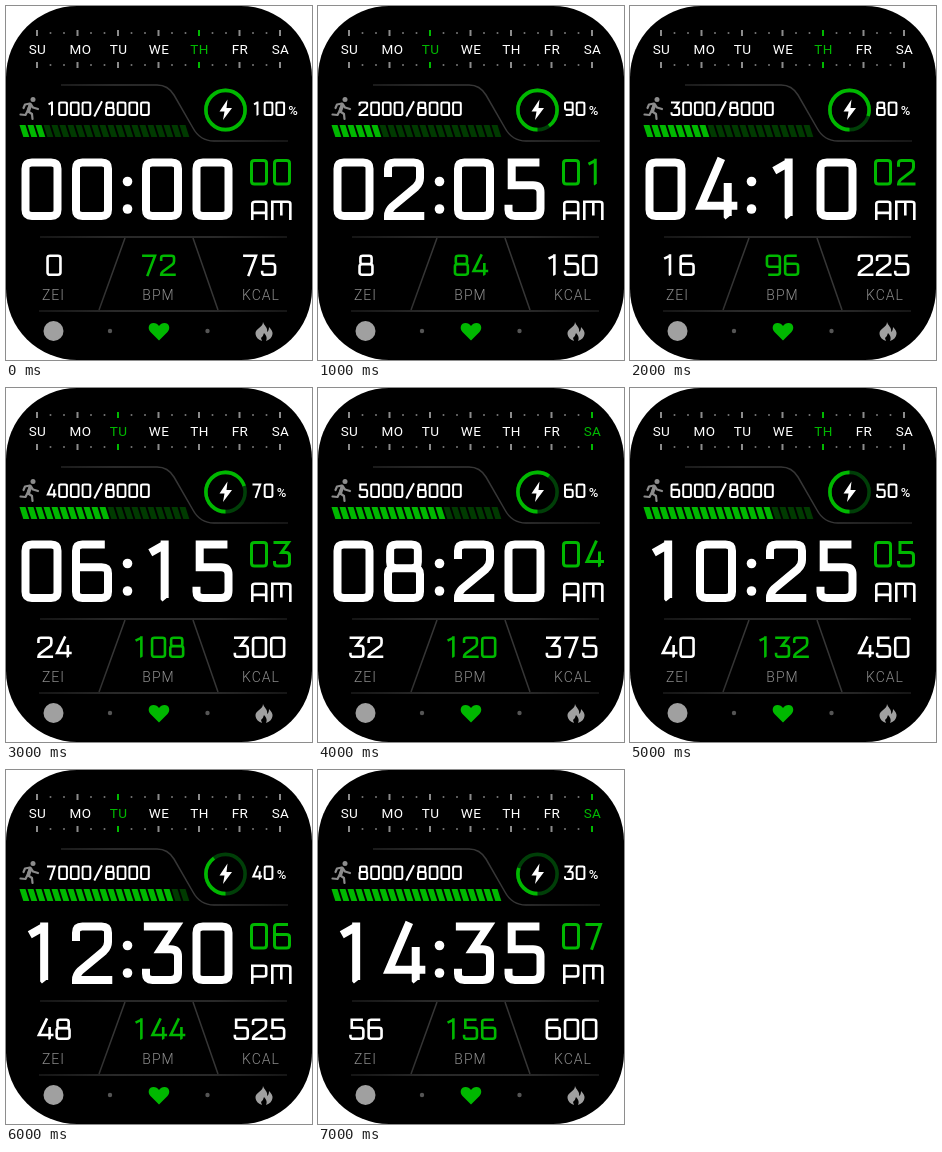
These frames come from a looping animation (306 px wide and 354 px high, 8 s). An HTML page:

```html
<!DOCTYPE html>
<html lang="en">
<head>
<meta charset="utf-8">
<title>Watch face</title>
<style>
  html, body { margin: 0; width: 100%; height: 100%; overflow: hidden; background: #fff; }
  svg { display: block; width: 306px; height: 354px; }
  text { font-family: Roboto, "Open Sans", sans-serif; text-anchor: middle; }
  .glyph path { fill: none; stroke: currentColor; vector-effect: non-scaling-stroke; stroke-miterlimit: 3; }
  .white { color: #fff; }
  .green { color: #00b800; }
  .line { fill: none; stroke: url(#fade); stroke-width: 1.5; }
  .label { font-size: 14px; font-weight: 300; letter-spacing: 1px; fill: #8c8c8c; }
  .day text { font-size: 13.5px; font-weight: 400; letter-spacing: .4px; fill: #fff; }
  .day path { stroke: #8c8c8c; stroke-width: 2; }
  .day.on text { fill: #00b800; }
  .day.on path { stroke: #00b800; }
  .bar { fill: #003a00; }
  .bar.on { fill: #00b800; }
</style>
</head>
<body>
<svg viewBox="0 0 306 354">
  <defs>
    <linearGradient id="fade" gradientUnits="userSpaceOnUse" x1="33" x2="283" y1="0" y2="0">
      <stop offset="0" stop-color="#1c1c1c"/>
      <stop offset=".3" stop-color="#363636"/>
      <stop offset=".7" stop-color="#363636"/>
      <stop offset="1" stop-color="#1c1c1c"/>
    </linearGradient>
  </defs>
  <rect width="306" height="354" rx="71"/>
  <g id="days"></g>

  <g class="line">
    <path d="M55 79H151Q162 79 168 89L187 122Q194 135 208 135H282"/>
    <path d="M34 231.01L281 231M33 305.01L281 305"/>
    <path d="M119 232L93 304M187 232L212 304"/>
  </g>

  <g fill="none" stroke="#8c8c8c" stroke-width="2.2" stroke-linecap="round" stroke-linejoin="round">
    <circle cx="27" cy="93.5" r="2.5" fill="#8c8c8c" stroke="none"/>
    <path d="M17.5 102L19 98.5L24 97.5L27 101.5L32 103"/>
    <path d="M24 98L21.5 105L26 108L26.5 113M21.5 105L19.5 109L14.5 108.5"/>
    <path d="M24.5 99L22.5 104.5" stroke-width="3.6"/>
  </g>
  <g id="bars"></g>

  <g fill="none" stroke-width="3.6">
    <circle cx="219.5" cy="104" r="19.6" stroke="#003f08"/>
    <circle id="ring" cx="219.5" cy="104" r="19.6" stroke="#00b800" pathLength="100" transform="rotate(90 219.5 104)"/>
  </g>
  <path d="M221.5 93.500L213.500 105.500H218.500L217 114L226 102H220.500Z" fill="#fff"/>

  <g id="steps" class="glyph white"></g>
  <g id="battery" class="glyph white"></g>
  <text id="percent" y="109" font-size="13" font-weight="500" fill="#fff">%</text>

  <g id="hours" class="glyph white"></g>
  <g id="minutes" class="glyph white"></g>
  <circle cx="121.500" cy="175.500" r="4.800" fill="#fff"/>
  <circle cx="121.500" cy="203" r="4.800" fill="#fff"/>
  <g id="seconds" class="glyph green"></g>
  <g id="half" class="glyph white"></g>

  <g id="score" class="glyph white"></g>
  <g id="pulse" class="glyph green"></g>
  <g id="energy" class="glyph white"></g>
  <text class="label" x="47.5" y="294">ZEI</text>
  <text class="label" x="152.5" y="294">BPM</text>
  <text class="label" x="255" y="294">KCAL</text>

  <circle cx="47.5" cy="325" r="10" fill="#a0a0a0"/>
  <circle cx="104" cy="325" r="2.2" fill="#555"/>
  <circle cx="201.5" cy="325" r="2.2" fill="#555"/>
  <path d="M153 334.5L144.5 326C141 322 143 317 147.5 317Q151 317 153 320Q155 317 158.5 317C163 317 165 322 161.5 326Z" fill="#00b800"/>
  <path d="M257 316C258 320 262 321 261 326Q263 325 263 321Q267 325 266.5 328Q266 333 260 335Q262 331 258 327Q257 331 255 332L256 335Q250 333 249.5 328C249 322 257 322 257 316Z" fill="#a0a0a0"/>
</svg>
<script>
  // Centre lines of the display face on a 30 x 52 cell.
  const bowl = 'M0 46Q0 52 6 52H24Q30 52 30 46V';
  const glyphs = {
    0: 'M6 0H24Q30 0 30 6V46Q30 52 24 52H6Q0 52 0 46V6Q0 0 6 0Z',
    1: 'M4 8L16 1M17.5 -4V52l.8 1',
    2: 'M0 14V6Q0 0 6 0H24Q30 0 30 6V15Q30 20 26 24L4 43Q0 47 0 52H34',
    3: 'M-2 0H28L14 22H23Q30 22 30 29V45Q30 52 23 52H6Q0 52 0 46V41',
    4: 'M20 -4L1 42H35M26 20V52l.8 1',
    5: 'M29 0H3V22H23Q30 22 30 29V45Q30 52 23 52H6Q0 52 0 46V41',
    6: 'M27 0H6Q0 0 0 6V46' + bowl + '28Q30 22 24 22H0',
    7: 'M-2 0H28L10 56',
    8: 'M8 0H22Q28 0 28 6V17Q28 23 22 23H8Q2 23 2 17V6Q2 0 8 0ZM0 46' + bowl + '29Q30 23 24 23H6Q0 23 0 29Z',
    9: 'M3 52H24Q30 52 30 46V6Q30 0 24 0H6Q0 0 0 6V24Q0 30 6 30H30',
    '/': 'M0 58L30 -5',
    A: 'M0 56V6Q0 0 6 0H24Q30 0 30 6V56M0 34H30',
    P: 'M0 56V0H24Q30 0 30 6V27Q30 33 24 33H0',
    M: 'M0 56V0H25Q30 0 30 6V56M15 0V42'
  };
  const $ = id => document.getElementById(id);

  function write(id, text, x, y, w, h, gap, weight) {
    $(id).innerHTML = [...String(text)].map((c, i) => {
      const cw = c === 'M' ? w * 1.25 : w;
      const left = x + i * (w + gap) + weight / 2;
      const sx = (cw - weight) / 30, sy = (h - weight) / 52;
      return `<path d="${glyphs[c]}" stroke-width="${weight}" transform="translate(${left} ${y + weight / 2}) scale(${sx} ${sy})"/>`;
    }).join('');
  }

  function stat(id, value, centre) {
    const n = String(value).length;
    write(id, value, centre - (n * 18.2 - 2.7) / 2, 248.5, 15.5, 21.5, 2.7, 2.6);
  }

  const names = ['SU', 'MO', 'TU', 'WE', 'TH', 'FR', 'SA'];
  const order = [4, 2, 4, 2, 6, 4, 2, 6];
  $('days').innerHTML = names.map((name, i) => {
    const x = 31 + i * 40.5;
    const dots = i < 6 ? [13.5, 27].map(d => [27, 59].map(y =>
      `<circle cx="${x + d}" cy="${y}" r="1" fill="#777"/>`).join('')).join('') : '';
    return `<g class="day"><path d="M${x} 24V30M${x} 56V62"/><text x="${x + (i === 1 ? 3 : 0.5)}" y="48">${name}</text></g>${dots}`;
  }).join('');
  $('bars').innerHTML = Array.from({ length: 21 }, (_, i) =>
    `<path class="bar" d="M${13.5 + i * 8} 119h6l3.8 12h-6z"/>`).join('');
  const days = document.querySelectorAll('.day');
  const bars = document.querySelectorAll('.bar');
  const pad = n => String(n).padStart(2, '0');

  function show(k) {
    const charge = 100 - k * 10;
    const lit = Math.ceil(21 * (k + 1) / 8);
    days.forEach((d, i) => d.classList.toggle('on', i === order[k]));
    bars.forEach((b, i) => b.classList.toggle('on', i < lit));
    $('ring').setAttribute('stroke-dasharray', `${charge} ${100 - charge}`);
    write('steps', (k + 1) * 1000 + '/8000', 40.5, 95.5, 9.7, 14.5, 2, 2);
    write('battery', charge, 246, 95.5, 9.7, 14.5, 2, 2);
    $('percent').setAttribute('x', charge === 100 ? 287 : 275.5);
    write('hours', pad(k * 2), 15.5, 152.5, 40, 61.5, 10.5, 8);
    write('minutes', pad(k * 5), 136, 152.5, 40, 61.5, 10.5, 8);
    write('seconds', pad(k), 244, 153, 18, 26.5, 5, 3);
    write('half', k < 6 ? 'AM' : 'PM', 245, 194.5, 16.5, 19.5, 3.5, 2.6);
    stat('score', k * 8, 48);
    stat('pulse', 72 + k * 12, 152.5);
    stat('energy', (k + 1) * 75, 253.5);
  }

  let shown = -1;
  const start = performance.now();
  function tick() {
    const k = Math.floor((performance.now() - start) / 1000) % 8;
    if (k !== shown) show(shown = k);
    requestAnimationFrame(tick);
  }
  tick();
</script>
</body>
</html>
```
